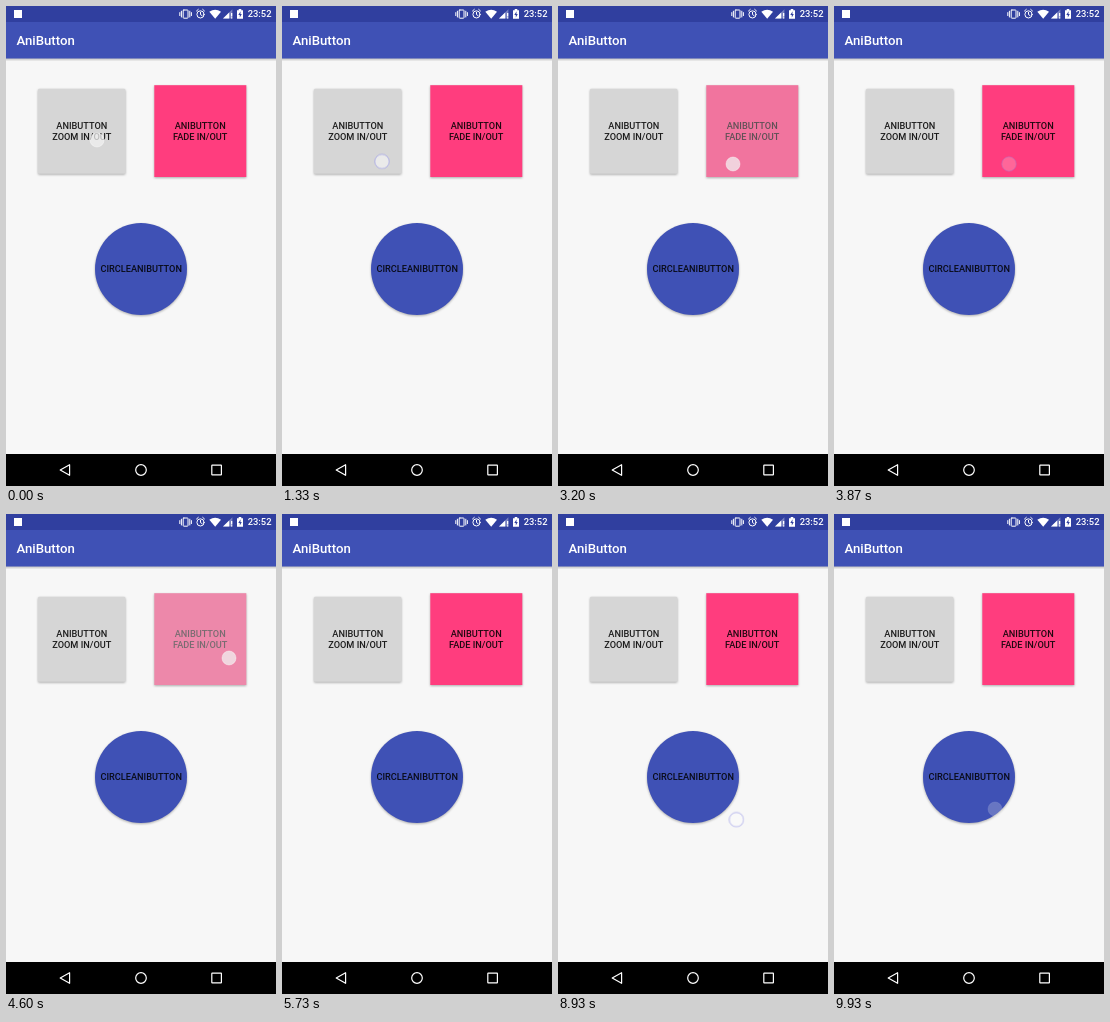
Write an HTML page that moves like this. It is 270x480 px and loops after 9990 ms.

```html
<!DOCTYPE html>
<html lang="en">
<head>
<meta charset="utf-8">
<title>AniButton</title>
<style>
  html, body { margin: 0; width: 100%; height: 100%; overflow: hidden; background: #f7f7f7; }
  svg { display: block; width: 270px; height: 480px; font-family: Roboto, "Noto Sans", sans-serif; font-weight: 500; }

  .caption { font-size: 9.2px; text-anchor: middle; fill: #000; fill-opacity: .87; }
  .raised { filter: drop-shadow(0 1px 1px rgba(0, 0, 0, .3)); }
  .icon { fill: none; stroke: #fff; stroke-linejoin: round; stroke-linecap: round; }

  .loop { animation: 9.99s linear infinite; }
  #zoom { transform-origin: 75.5px 125px; animation-name: zoom; }
  #circle { transform-origin: 135px 263px; animation-name: swell; }
  #fade { animation-name: fade; }
  #spot { animation-name: move; }
  #show { animation-name: show; }
  #press { animation-name: press; }
  #ring { animation-name: ring; }

  @keyframes zoom {
    0%, .7% { transform: scale(1); animation-timing-function: ease-in-out; }
    3.7%, 9.4% { transform: scale(1.2); animation-timing-function: ease-in-out; }
    12.4%, 100% { transform: scale(1); }
  }
  @keyframes swell {
    0%, 61.36% { transform: scale(1); animation-timing-function: ease-in-out; }
    64.06%, 66.77% { transform: scale(1.2); animation-timing-function: ease-in-out; }
    69.77%, 100% { transform: scale(1); }
  }
  @keyframes fade {
    0%, 30.68% { opacity: 1; }
    32.03% { opacity: .65; }
    33.38%, 34.03% { opacity: .4; }
    37.39%, 44.09% { opacity: 1; }
    46.05% { opacity: .52; }
    46.8%, 50.7% { opacity: .4; }
    53.4%, 100% { opacity: 1; }
  }
  @keyframes move {
    0%, 4% { transform: translate(91px, 134px); }
    11.01%, 20% { transform: translate(100px, 155.5px); }
    20.01%, 41% { transform: translate(175px, 158px); }
    41.01%, 57% { transform: translate(223px, 144px); }
    57.01%, 69.77% { transform: translate(150px, 262px); }
    74.07%, 80% { transform: translate(182px, 230px); }
    80.01%, 85% { transform: translate(190px, 311px); }
    94.09% { transform: translate(166px, 300px); }
    99.4%, 100% { transform: translate(161px, 295px); }
  }
  @keyframes show {
    0%, 14.01% { opacity: 1; }
    17.02%, 26.03% { opacity: 0; }
    29.33%, 37.39% { opacity: 1; }
    40.74%, 42.74% { opacity: 0; }
    43.34%, 53.4% { opacity: 1; }
    56.06%, 60.06% { opacity: 0; }
    60.76%, 77.98% { opacity: 1; }
    79.38%, 84.18% { opacity: 0; }
    84.78%, 100% { opacity: 1; }
  }
  @keyframes press {
    0%, 9.4% { opacity: 1; }
    12%, 20% { opacity: .6; }
    20.01%, 29.33% { opacity: 0; }
    30.03%, 34.03% { opacity: 1; }
    37.39%, 41% { opacity: .2; }
    43.34%, 50.7% { opacity: 1; }
    53.4%, 60.76% { opacity: .2; }
    61.36%, 66.77% { opacity: 1; }
    69.77%, 94.09% { opacity: 0; }
    97%, 100% { opacity: .32; }
  }
  @keyframes ring {
    0%, 9.4% { opacity: 0; }
    12%, 29.33% { opacity: 1; }
    30.03%, 34.03% { opacity: 0; }
    37.39%, 42.74% { opacity: 1; }
    43.34%, 50.7% { opacity: 0; }
    53.4%, 60.76% { opacity: 1; }
    61.36%, 66.77% { opacity: 0; }
    69.77%, 94.09% { opacity: 1; }
    97%, 100% { opacity: 0; }
  }
</style>
</head>
<body>
<svg viewBox="0 0 270 480">
  <defs>
    <linearGradient id="shade" x2="0" y2="1">
      <stop stop-opacity=".24"/>
      <stop offset="1" stop-opacity="0"/>
    </linearGradient>
  </defs>
  <rect width="270" height="480" fill="#f7f7f7"/>

  <!-- App bar -->
  <rect y="52" width="270" height="3.5" fill="url(#shade)"/>
  <rect width="270" height="52.5" fill="#3f51b5"/>
  <rect width="270" height="16" fill="#303f9f"/>
  <text x="10.5" y="39" font-size="13.2" fill="#fff">AniButton</text>

  <!-- Status icons -->
  <rect x="8" y="4" width="8" height="8" fill="#fff"/>
  <g class="icon" stroke-width="1">
    <rect x="177.2" y="4" width="4.8" height="8.2" rx=".6"/>
    <path d="M175.4 5.2v5.8M173.8 6.6v3M183.8 5.2v5.8M185.4 6.6v3"/>
    <circle cx="194.5" cy="8.4" r="3.6"/>
    <path d="M194.5 6.3v2.3l1.6 1M190.5 5l1.8-1.6M198.5 5l-1.8-1.6"/>
  </g>
  <g fill="#fff">
    <path d="M203.3 5.8Q209.2 1.6 215 5.8L209.2 12.8Z"/>
    <path d="M217 12.6L226.4 3.2V12.6Z" opacity=".35"/>
    <path d="M217 12.6L223.2 6.4V12.6Z"/>
    <path d="M225 7h1.3v3.4h-1.3zM225 11.2h1.3v1.3h-1.3z"/>
    <path d="M231 4.2h1.7v-1.1h2.6v1.1h1.7v8.6h-6z"/>
    <path d="M234.6 5.3L232.3 9h1.5v2.6L235.8 8h-1.4z" fill="#303f9f"/>
    <text x="265.5" y="11.4" font-size="9.4" text-anchor="end">23:52</text>
  </g>

  <!-- Buttons -->
  <g id="zoom" class="loop">
    <rect class="raised" x="32" y="82.7" width="87.4" height="85" rx="1.3" fill="#d6d6d6"/>
    <text class="caption" x="75.8" y="123.3">ANIBUTTON</text>
    <text class="caption" x="75.8" y="134.1">ZOOM IN/OUT</text>
  </g>

  <rect class="raised" x="148.3" y="79.2" width="92" height="91.8" fill="#dadada"/>
  <g id="fade" class="loop">
    <rect x="148.3" y="79.2" width="92" height="91.8" fill="#ff3d7e"/>
    <text class="caption" x="194.2" y="123.3">ANIBUTTON</text>
    <text class="caption" x="194.2" y="134.1">FADE IN/OUT</text>
  </g>

  <g id="circle" class="loop">
    <circle class="raised" cx="135" cy="263" r="46" fill="#3f51b5"/>
    <text class="caption" x="135.2" y="266.4">CIRCLEANIBUTTON</text>
  </g>

  <!-- Navigation bar -->
  <rect y="448" width="270" height="32"/>
  <g class="icon" stroke-width="1.2">
    <path d="M54.2 464L63.6 458.7V469.3Z"/>
    <circle cx="135" cy="464" r="5.3"/>
    <rect x="205.8" y="459.2" width="9.6" height="9.6" rx=".4"/>
  </g>

  <!-- Touch spot -->
  <g id="spot" class="loop">
    <g id="show" class="loop">
      <circle id="press" class="loop" r="7" fill="#f0f0f0" fill-opacity=".75" stroke="#fff" stroke-opacity=".4"/>
      <circle id="ring" class="loop" r="7.2" fill="#fff" fill-opacity=".25" stroke="#8c8ce6" stroke-opacity=".65" stroke-width=".9"/>
    </g>
  </g>
</svg>
</body>
</html>
```
